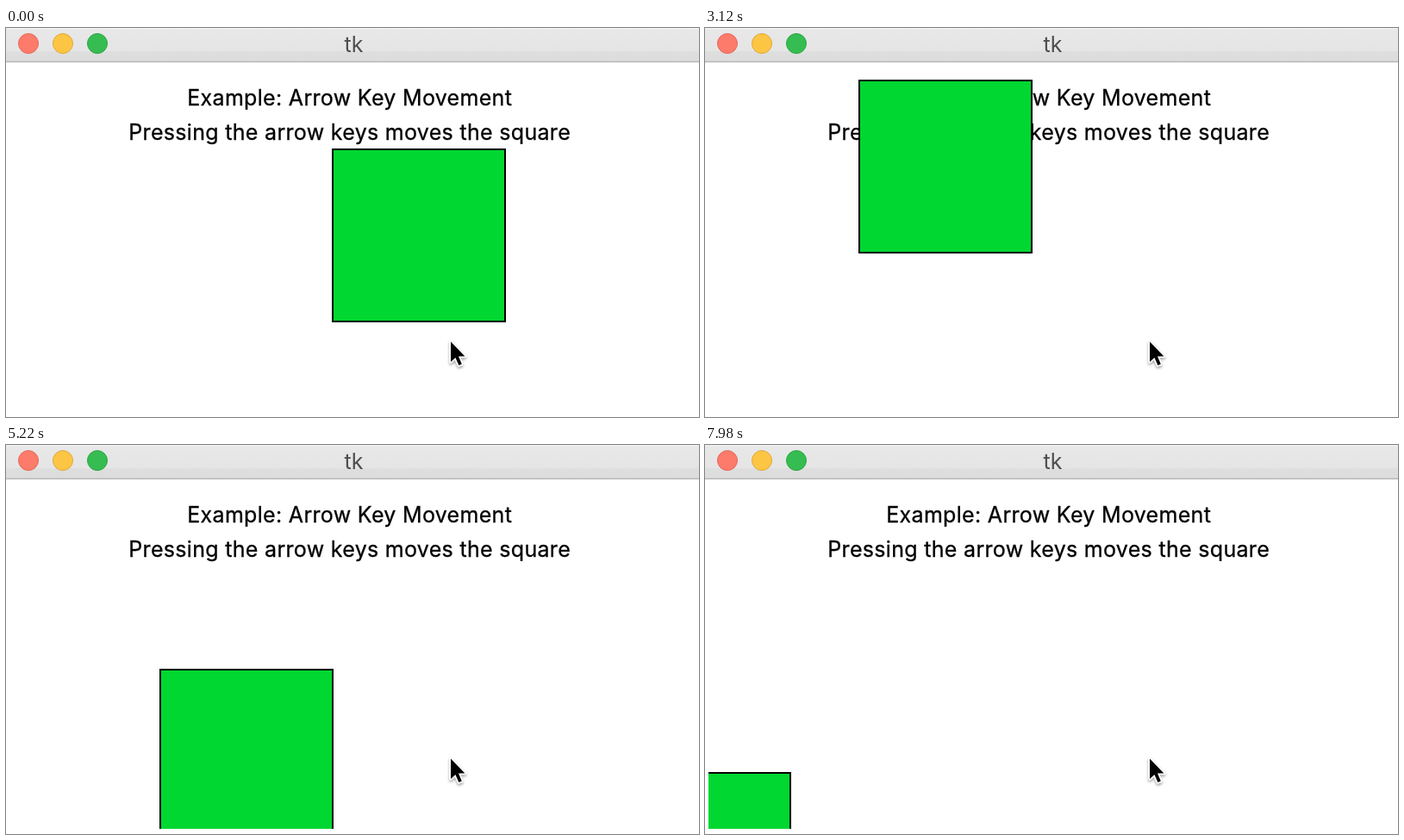
An HTML page for the animation above (8000 ms loop, 804 by 452 pixels).

```html
<!DOCTYPE html>
<html lang="en">
<head>
<meta charset="utf-8">
<title>Arrow Key Movement</title>
<style>
  html, body { margin: 0; width: 100%; height: 100%; overflow: hidden; background: #fff; }
  svg { display: block; width: 100%; height: 100%; }
  text { font: 25px Inter, "Noto Sans", sans-serif; text-anchor: middle; }
  .label { letter-spacing: .31px; stroke: #000; stroke-width: .3px; }
  .cursor { filter: drop-shadow(0 2px 1.5px rgba(0, 0, 0, .35)); }
</style>
</head>
<body>
<svg viewBox="0 0 804 452">
  <defs>
    <linearGradient id="bar" x1="0" y1="0" x2="0" y2="1">
      <stop offset="0" stop-color="#e8e8e8"/>
      <stop offset=".67" stop-color="#e5e5e5"/>
      <stop offset=".67" stop-color="#dedede"/>
      <stop offset="1" stop-color="#dcdcdc"/>
    </linearGradient>
    <clipPath id="canvas"><rect x="4" y="46" width="796" height="400"/></clipPath>
  </defs>

  <rect width="804" height="452" fill="#fff"/>
  <rect width="804" height="40" fill="url(#bar)"/>
  <rect width="804" height="1.5" fill="#f4f1f1"/>
  <rect y="38.5" width="804" height="1.5" fill="#b9b9b9"/>
  <circle cx="26" cy="18" r="11.5" fill="#fc7b6b" stroke="#e7685b"/>
  <circle cx="66" cy="18" r="11.5" fill="#fdc544" stroke="#e0a93a"/>
  <circle cx="106" cy="18" r="11.5" fill="#36bd51" stroke="#2ca445"/>
  <text x="403.5" y="28" fill="#4e4e4e">tk</text>

  <text class="label" x="398.7" y="90">Example: Arrow Key Movement</text>
  <text class="label" x="398.7" y="130">Pressing the arrow keys moves the square</text>

  <g clip-path="url(#canvas)">
    <rect id="square" width="200" height="200" fill="#00d731" stroke="#000" stroke-width="2"/>
  </g>

  <path class="cursor" d="M516 364.5V388L521.4 383L525.4 392L528.8 390.6L525 381.4H532.4Z"
        stroke="#fff" stroke-width="3.5" stroke-linejoin="round" paint-order="stroke"/>
</svg>
<script>
  const LOOP = 8000, STEP = 20;
  const START = { x: 379, y: 141 };

  // Held keys: each run moves one step per interval
  const runs = [
    { at: 617,  dx: -1, dy: 0,  steps: 10, every: 81 },
    { at: 1427, dx: 0,  dy: 1,  steps: 8,  every: 81 },
    { at: 2075, dx: 0,  dy: -1, steps: 22, every: 81 },
    { at: 3857, dx: 0,  dy: 1,  steps: 4,  every: 81 },
    { at: 4181, dx: 0,  dy: 1,  steps: 30, every: 64 },
    { at: 6101, dx: 0,  dy: -1, steps: 8,  every: 84.5 },
    { at: 6777, dx: -1, dy: 0,  steps: 14, every: 84.5 }
  ];

  const square = document.getElementById("square");

  function draw(t) {
    let { x, y } = START;
    for (const r of runs) {
      const n = Math.max(0, Math.min(r.steps, Math.floor((t - r.at) / r.every)));
      x += n * r.dx * STEP;
      y += n * r.dy * STEP;
    }
    square.setAttribute("x", x);
    square.setAttribute("y", y);
  }

  const begin = performance.now();
  function tick() {
    draw((performance.now() - begin) % LOOP);
    requestAnimationFrame(tick);
  }
  tick();
</script>
</body>
</html>
```
